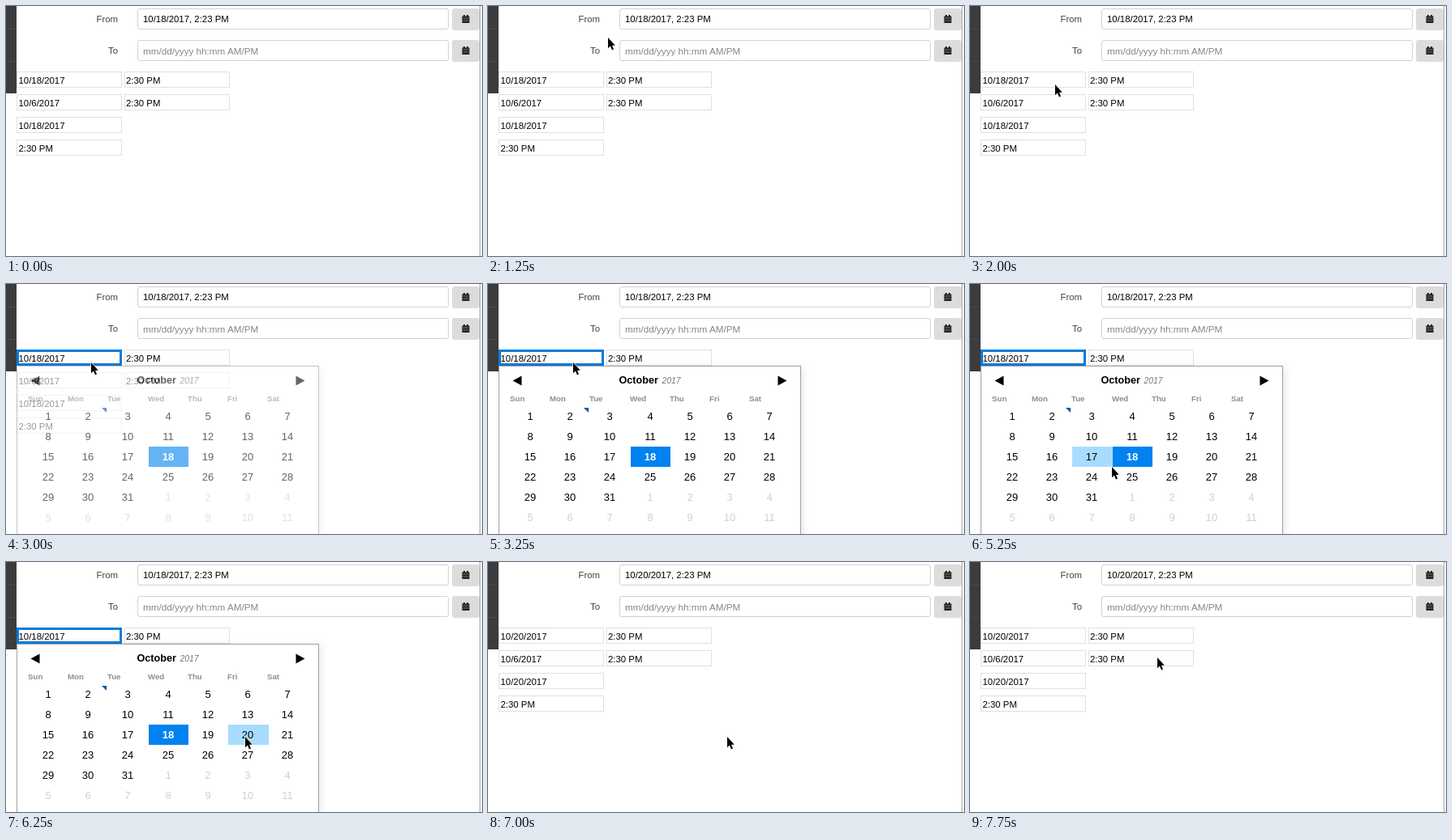
An HTML page that plays this animation: 587x309 px, repeating every 8000 ms.

```html
<!DOCTYPE html>
<html lang="en">
<head>
<meta charset="utf-8">
<title>Date picker</title>
<style>
  html, body { margin: 0; width: 100%; height: 100%; overflow: hidden; background: #fff; }
  svg { display: block; }
  text { font: 11.4px "Liberation Sans", Arial, sans-serif; white-space: pre; }
  .label { fill: #444; text-anchor: end; }
  .hint { font-size: 11.7px; fill: #858585; }
  .day { font-size: 13px; text-anchor: middle; }
  .picked { fill: #fff; font-weight: bold; }
  .other { fill: #d0d0d0; }
  .weekday { font-size: 9.7px; font-weight: bold; fill: #8e8e8e; }
  .month { font-size: 12.6px; font-weight: bold; }
  .year { font-size: 10.4px; font-style: italic; fill: #777; }
  .panel { filter: drop-shadow(2px 2px 5px rgba(0, 0, 0, .1)); }
</style>
</head>
<body>
<svg width="587" height="309" viewBox="0 0 587 309">
  <g id="page"></g>
  <rect id="focus" x="14.5" y="82.5" width="127" height="17" fill="none" stroke="#0a7cd8" stroke-width="3"/>
  <g id="values"></g>
  <g id="popup">
    <rect class="panel" x="13.5" y="101.5" width="372" height="240" fill="#fff" stroke="#a0a0a0"/>
    <path d="M30.5 119.5L41.5 113.5V125.5ZM368.5 119.5L357.5 113.5V125.5Z"/>
    <text class="month" x="161.5" y="123">October</text>
    <text class="year" x="214.5" y="123">2017</text>
    <rect id="hover" width="50" height="25" fill="#a8dcff"/>
    <rect x="176" y="201" width="49" height="25" fill="#0082f0"/>
    <path d="M118 153H124V159Z" fill="#0a55b0"/>
    <g id="days"></g>
  </g>
  <rect width="13" height="309" fill="#fff"/>
  <rect width="13" height="108" fill="#3c3c3e"/>
  <path d="M0 28.5H13M0 68.5H13" stroke="#4a4a4c"/>
  <path d="M584.5 0V309" stroke="#a6a6a6"/>
  <path id="cursor" d="M2 1V14.2L4.9 11.5L7 16.4L9 15.5L7 10.8H10.8Z"
        stroke="#fff" stroke-width="1.4" paint-order="stroke"/>
</svg>
<script>
const LOOP = 8000, TICK = 250;
const OPEN = 3000, CLOSE = 7000;
const $ = id => document.getElementById(id);

function add(parent, tag, attrs, content = '') {
  const el = document.createElementNS('http://www.w3.org/2000/svg', tag);
  for (const key in attrs) el.setAttribute(key, attrs[key]);
  el.textContent = content;
  return $(parent).appendChild(el);
}
const write = (parent, x, y, content, style = '') =>
  add(parent, 'text', { x, y, class: style }, content);
const box = (x, y, width, height, stroke, rx = 0) =>
  add('page', 'rect', { x: x + .5, y: y + .5, width: width - 1, height: height - 1, rx, fill: '#fff', stroke });

// Form rows with their calendar buttons
['From', 'To'].forEach((name, row) => {
  const y = 3 + 39 * row;
  write('page', 138, y + 17, name, 'label');
  box(162, y, 384, 26, '#d2d2d2', 2.5);
  add('page', 'rect', { x: 550, y, width: 34, height: 27, rx: 3, fill: '#dcdcdc' });
  add('page', 'path', { d: `M562.5 ${y + 9.5}h9v8.5h-9zM564 ${y + 8}h2v2h-2zM568 ${y + 8}h2v2h-2z`, fill: '#222' });
  add('page', 'path', { d: `M563.5 ${y + 12}h7M563.5 ${y + 15}h7`, stroke: '#999', 'stroke-width': .7 });
});
write('page', 169, 60, 'mm/dd/yyyy hh:mm AM/PM', 'hint');

// Small inputs: two pairs, then two single ones
const rowY = row => 81 + 28 * row;
for (let row = 0; row < 4; row++) {
  box(13, rowY(row), 130, 20, '#e0e0e0');
  if (row < 2) {
    box(146, rowY(row), 130, 20, '#e0e0e0');
    write('page', 148, rowY(row) + 15, '2:30 PM');
  }
}
write('page', 15.5, rowY(1) + 15, '10/6/2017');
write('page', 15.5, rowY(3) + 15, '2:30 PM');

// Values bound to the chosen date
const fullValue = write('values', 169, 20, '');
const dateValues = [0, 2].map(row => write('values', 15.5, rowY(row) + 15, ''));

// Calendar grid
const GRID = { x: 28, y: 151, width: 49.2, height: 25 };
const cellX = column => Math.round(GRID.x + GRID.width * column);
const cellY = row => GRID.y + GRID.height * row;

'Sun Mon Tue Wed Thu Fri Sat'.split(' ')
  .forEach((name, i) => write('days', cellX(i) - 1, 145, name, 'weekday'));
for (let i = 0; i < 42; i++) {
  const style = i >= 31 ? 'other' : i === 17 ? 'picked' : '';
  write('days', cellX(i % 7) + 24, cellY(Math.floor(i / 7)) + 17, i % 31 + 1, 'day ' + style);
}

// Mouse strokes; powX and powY bend the ease-out of each axis
const home = { x: 193, y: 12 };
const strokes = [
  { start: 1100, end: 2000, x: 103, y: 96, powX: 4, powY: 2 },
  { start: 4150, end: 4750, x: 88, y: 203, powX: 3, powY: 1 },
  { start: 4750, end: 5250, x: 173, y: 225, powX: .5, powY: 2 },
  { start: 5250, end: 6250, x: 293, y: 215, powX: 2, powY: 6 },
  { start: 7250, end: 7750, x: 229, y: 117, powX: .9, powY: .7 }
];
function mouseAt(time) {
  let { x, y } = home;
  for (const stroke of strokes) {
    const left = 1 - Math.min(1, Math.max(0, (time - stroke.start) / (stroke.end - stroke.start)));
    x = stroke.x + (x - stroke.x) * left ** stroke.powX;
    y = stroke.y + (y - stroke.y) * left ** stroke.powY;
  }
  return { x: Math.round(x), y: Math.round(y) };
}

const place = (id, x, y) => $(id).setAttribute('transform', `translate(${x} ${y})`);
const show = (id, opacity) => $(id).setAttribute('opacity', Number(opacity));

function draw(time) {
  const mouse = mouseAt(time);
  place('cursor', mouse.x, mouse.y);
  show('cursor', time >= 750);

  // The highlight trails the pointer slightly
  const column = Math.floor((mouse.x + 1 - GRID.x) / GRID.width);
  const row = Math.floor((mouse.y - 3 - GRID.y) / GRID.height);
  place('hover', cellX(column), cellY(row));
  show('hover', row >= 0);

  const open = time >= OPEN && time < CLOSE;
  show('focus', open);
  show('popup', open && (time < OPEN + TICK ? .6 : 1));

  const date = `10/${time < CLOSE ? 18 : 20}/2017`;
  fullValue.textContent = date + ', 2:23 PM';
  dateValues.forEach(el => el.textContent = date);
}

function frame() {
  const time = performance.now() % LOOP;
  draw(Math.floor(time / TICK) * TICK);
  requestAnimationFrame(frame);
}
frame();
</script>
</body>
</html>
```
